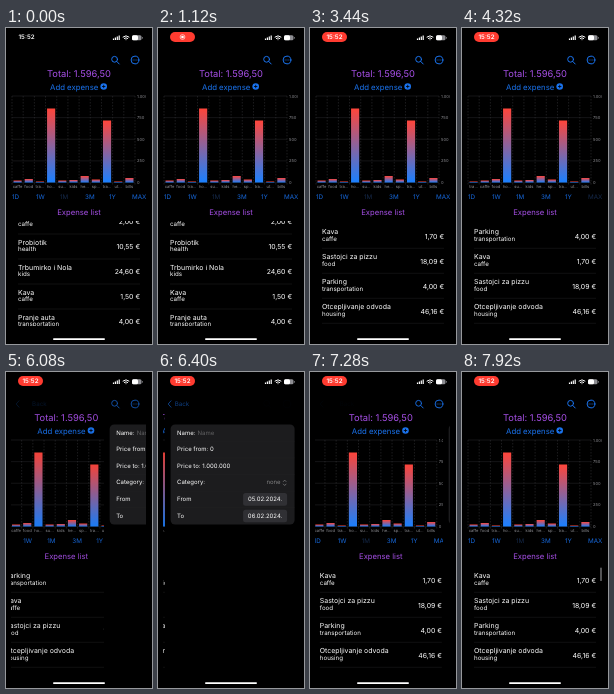
Recreate the animation shown at these times as an HTML page. Size 146x316 px, loop 8000 ms.

```html
<!DOCTYPE html>
<html lang="hr">
<head>
<meta charset="utf-8">
<title>Expenses</title>
<style>
html, body { margin: 0; width: 100%; height: 100%; overflow: hidden; background: #000; }
svg { display: block; width: 100%; height: 100%; font-family: Inter, Roboto, sans-serif; text-rendering: geometricPrecision; }
text { fill: #fff; dominant-baseline: central; }
.mid { text-anchor: middle; }
.end { text-anchor: end; }
.title { font-size: 6.95px; }
.sub { font-size: 6.2px; }
.sum { font-size: 6.9px; }
.form text { font-size: 6px; }
.tick { font-size: 4.1px; fill: #8e8e93; }
.chip { font-size: 6.3px; fill: #1668dc; }
.chip.on { fill: #15294a; }
.hot text { fill: #f08a74; }
.purple { fill: #a64fe6; }
.blue { fill: #1a73ee; }
.line { fill: none; stroke: #1a73ee; stroke-width: 1; stroke-linecap: round; }
.rule { stroke: #202023; stroke-width: .5; }
.grid { stroke: #29292c; stroke-width: .5; }
.dash { stroke: #38383c; stroke-dasharray: 1.5 1.5; }

.main, .form, .icons, .back, .shade, .label { animation: 8s cubic-bezier(.2,.8,.2,1) infinite; }
.main { animation-name: aside; }
.form { animation-name: enter; }
.icons { animation-name: hide; }
.back { animation-name: show; }
.label { animation-name: glide; }
.shade { animation-name: dim; }
@keyframes aside { 0%, 75.525% { transform: none } 81.775%, 87.904% { transform: translateX(-40.5px) } 94.15%, 100% { transform: none } }
@keyframes enter { 0%, 75.525% { transform: translateX(135px) } 81.775%, 87.904% { transform: none } 94.15%, 100% { transform: translateX(135px) } }
@keyframes hide { 0%, 75.525% { opacity: 1 } 81.775%, 88.5% { opacity: 0 } 94.15%, 100% { opacity: 1 } }
@keyframes show { 0%, 75.525% { opacity: 0 } 81.775%, 87.904% { opacity: .55 } 94.15%, 100% { opacity: 0 } }
@keyframes glide { 0%, 75.525% { transform: translateX(14px) } 81.775%, 87.904% { transform: none } 94.15%, 100% { transform: translateX(14px) } }
@keyframes dim { 0%, 75.525% { opacity: 0 } 81.775%, 87.904% { opacity: .12 } 94.15%, 100% { opacity: 0 } }

.month, .recent, .scrolled, .week, .all, .plain, .pill, .rec, .clock, .scroller { animation: 8s step-end infinite; }
.month { animation-name: month; }
.recent { animation-name: recent; }
.scrolled { animation-name: scrolled; }
.week { animation-name: week; }
.all { animation-name: all; }
.plain { animation-name: plain; }
.pill { animation-name: pill; }
.rec { animation-name: rec; }
.clock { animation-name: clock; }
.scroller { animation-name: scroller; }
@keyframes month { 0%, 32%, 87.875% { visibility: visible } 17.5%, 52.5% { visibility: hidden } }
@keyframes recent { 0%, 52.5% { visibility: hidden } 32%, 87.875% { visibility: visible } }
@keyframes scrolled { 0% { visibility: visible } 17.5% { visibility: hidden } }
@keyframes week { 0%, 32% { visibility: hidden } 17.5% { visibility: visible } }
@keyframes all { 0%, 87.875% { visibility: hidden } 52.5% { visibility: visible } }
@keyframes plain { 0% { visibility: visible } 6% { visibility: hidden } }
@keyframes pill { 0% { visibility: hidden } 6% { visibility: visible } }
@keyframes rec { 0%, 29% { visibility: hidden } 6% { visibility: visible } }
@keyframes clock { 0% { visibility: hidden } 29% { visibility: visible } }
@keyframes scroller { 0% { visibility: hidden } 96% { visibility: visible } }
</style>
</head>
<body>
<svg viewBox="0 0 146 316" preserveAspectRatio="none">
  <defs>
    <linearGradient id="heat" x2="0" y2="1"><stop stop-color="#ff453a"/><stop offset="1" stop-color="#1a80ff"/></linearGradient>
    <clipPath id="screen"><rect x="5" width="135" height="316"/></clipPath>
    <clipPath id="rows"><rect x="5" y="193" width="135" height="105"/></clipPath>
  </defs>
  <rect width="146" height="316"/>

  <g clip-path="url(#screen)">
    <g class="main">
      <text class="mid purple" x="73" y="46.5" font-size="9.35">Total: 1.596,50</text>
      <text class="blue" x="44" y="58.5" font-size="7.8">Add expense</text>
      <circle class="blue" cx="97.7" cy="58.5" r="3.3"/>
      <path d="M96 58.5h3.4M97.7 56.8v3.4" stroke="#000" stroke-width=".8"/>
      <g id="charts"></g>
      <text class="mid purple" x="73" y="184" font-size="7.7">Expense list</text>
      <g id="lists" clip-path="url(#rows)"></g>
      <rect class="scroller" x="138.4" y="195.5" width="1.2" height="13.5" rx=".6" fill="#8a8a8e"/>
      <rect class="shade" width="190" height="316"/>
    </g>
    <g class="form">
      <rect x="5" width="135" height="316"/>
      <rect x="11" y="52.5" width="124" height="100" rx="4.5" fill="#1c1c1e"/>
      <g id="fields"></g>
    </g>
  </g>

  <g class="icons">
    <circle class="line" cx="108.6" cy="31.3" r="2.9"/><path class="line" d="M110.8 33.5l2.4 2.5"/>
    <circle class="line" cx="129" cy="32" r="3.9"/>
    <path d="M127.1 32h0m1.9 0h0m1.9 0h0" class="line"/>
  </g>
  <g class="back">
    <path class="line" d="M13 28.8l-2.8 3.2 2.8 3.2"/>
    <text class="blue label" x="16.5" y="32" font-size="6.2">Back</text>
  </g>

  <text class="plain" x="12.5" y="9.6" font-size="6.2" font-weight="600">15:52</text>
  <rect class="pill" x="12" y="4" width="25" height="10" rx="5" fill="#ff3b30"/>
  <g class="rec"><circle cx="24.5" cy="9" r="2.4" fill="none" stroke="#fff" stroke-width=".6"/><circle cx="24.5" cy="9" r="1.3" fill="#fff"/></g>
  <text class="mid clock" x="24.5" y="9.1" font-size="6.2" font-weight="600">15:52</text>
  <path d="M107.5 12v-1.6m1.9 1.6v-2.5m1.9 2.5v-3.5m1.9 3.5v-4.5" stroke="#fff" stroke-width="1.2"/>
  <path d="M117 9q3-2.6 6 0M118.3 10.4q1.7-1.4 3.4 0M120 11.7h0" fill="none" stroke="#fff" stroke-width="1" stroke-linecap="round"/>
  <rect x="126" y="7.3" width="9.5" height="5" rx="1.5" fill="#8e8e93"/>
  <rect x="126" y="7.3" width="6" height="5" rx="1.5" fill="#fff"/>
  <rect x="136" y="9" width=".7" height="1.7" fill="#8e8e93"/>
  <rect x="47" y="310.2" width="52" height="1.8" rx=".9" fill="#fff"/>
</svg>
<script>
const el = id => document.getElementById(id);
const text = (x, y, str, cls = '') => `<text x="${x}" y="${y}" class="${cls}">${str}</text>`;
const line = (x1, y1, x2, y2, cls) => `<path d="M${x1} ${y1}L${x2} ${y2}" class="${cls}"/>`;

const LEFT = 6, RIGHT = 129, TOP = 68, BASE = 154.5;
const CHIPS = { '1D': 6, '1W': 30, '1M': 54, '3M': 79, '1Y': 103, MAX: 126 };

function chart(cls, chip, ticks, labels, heights) {
  const step = (RIGHT - LEFT) / labels.length;
  let out = '';
  ticks.forEach((t, i) => {
    const y = TOP + (BASE - TOP) * i / 4;
    out += line(LEFT, y, RIGHT, y, 'grid') + text(131, y, t, 'tick');
  });
  for (let i = 0; i <= labels.length; i++) {
    const x = LEFT + i * step;
    out += line(x, TOP, x, BASE + 3, 'grid dash');
  }
  labels.forEach((name, i) => {
    const mid = LEFT + step * (i + .5), w = step * .73, h = heights[i];
    out += `<rect x="${mid - w / 2}" y="${BASE - h}" width="${w}" height="${h}" fill="url(#heat)"/>`;
    out += text(mid, 158.6, name, 'tick mid');
  });
  for (const c in CHIPS) out += text(CHIPS[c], 168.5, c, c === chip ? 'chip on' : 'chip');
  return `<g class="${cls}">${out}</g>`;
}

function list(cls, y0, rows) {
  const body = rows.map(([name, kind, sum, hot], i) => {
    const y = y0 + i * 25;
    return `<g class="${hot ? 'hot' : ''}">` + text(12, y - 3.9, name, 'title') + text(12, y + 3.4, kind, 'sub') +
      text(134, y + .2, sum + ' €', 'sum end') + '</g>' + line(12, y + 12.5, 134, y + 12.5, 'rule');
  });
  return `<g class="${cls}">${body.join('')}</g>`;
}

const thousand = ['1.000', '750', '500', '250', '0'];
el('charts').innerHTML =
  chart('month', '1M', thousand,
    ['caffe', 'food', 'tra…', 'ho…', 'su…', 'kids', 'he…', 'sp…', 'tra…', 'ut…', 'bills'],
    [2, 3.5, 1, 74, 2, 2.5, 6.5, 3, 62, 1, 4.5]) +
  chart('week', '1W', ['800', '600', '400', '200', '0'],
    ['caffe', 'food', 'sports', 'travel', 'subscr…', 'housing', 'bills'],
    [1, 1.5, 4, 77, 1, 83, 6]) +
  chart('all', 'MAX', thousand,
    ['tra…', 'caffe', 'food', 'ho…', 'su…', 'kids', 'he…', 'sp…', 'tra…', 'ut…', 'bills'],
    [1, 2, 3.5, 74, 2, 2.5, 6.5, 3, 62, 1, 4.5]);

const coffee = ['Kava', 'caffe', '1,70'];
const pizza = ['Sastojci za pizzu', 'food', '18,09'];
const parking = ['Parking', 'transportation', '4,00'];
const drain = ['Otcepljivanje odvoda', 'housing', '46,16'];
el('lists').innerHTML =
  list('scrolled', 193.5, [
    ['Kava', 'caffe', '2,00'],
    ['Probiotik', 'health', '10,55'],
    ['Trbumirko i Nola', 'kids', '24,60'],
    ['Kava', 'caffe', '1,50'],
    ['Pranje auta', 'transportation', '4,00']]) +
  list('week', 207.2, [
    coffee,
    ['Marenda', 'caffe', '2,18'],
    ['Bublice', 'food', '2,15'],
    ['Polivježba', 'sports', '37,50', true]]) +
  list('recent', 207.8, [coffee, pizza, parking, drain]) +
  list('all', 207.8, [parking, coffee, pizza, drain]);

const names = ['Name:', 'Price from: 0', 'Price to: 1.000.000', 'Category:', 'From', 'To'];
const rowY = i => 61 + i * 16.6;
const date = (i, str) => `<rect x="83.5" y="${rowY(i) - 6.3}" width="44" height="12.6" rx="2.5" fill="#303034"/>` +
  `<text x="105.5" y="${rowY(i)}" class="mid">${str}</text>`;
el('fields').innerHTML = names.map((n, i) => text(17.5, rowY(i), n) +
    (i ? line(17.5, rowY(i) - 8.3, 135, rowY(i) - 8.3, 'rule') : '')).join('') +
  `<g opacity=".3">${text(38, rowY(0), 'Name')}</g>` +
  `<g opacity=".45">${text(121, rowY(3), 'none', 'end')}` +
  `<path d="M123.5 ${rowY(3) - 1}l1.6-1.7 1.6 1.7m-3.2 2l1.6 1.7 1.6-1.7" fill="none" stroke="#fff" stroke-width=".7"/></g>` +
  date(4, '05.02.2024.') + date(5, '06.02.2024.');
</script>
</body>
</html>
```
